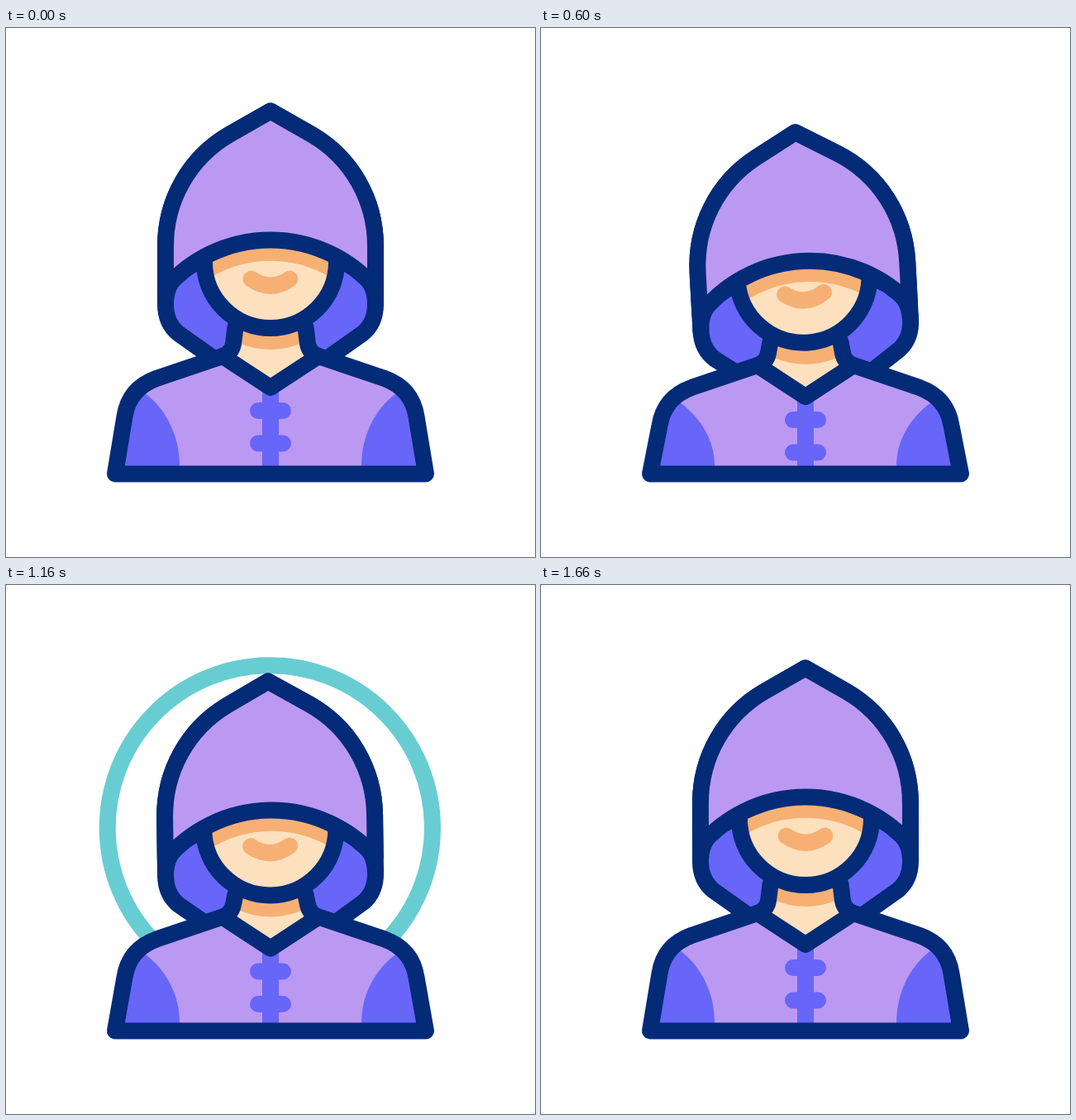
Recreate the animation shown at these times as an HTML page with a canvas. Size 640 by 640 pixels, loop 2080 ms.

```html
<!DOCTYPE html>
<html>
<head>
<meta charset="utf-8">
<title>Hooded figure</title>
<style>
html, body { margin: 0; overflow: hidden; background: #fff; }
canvas { display: block; }
</style>
</head>
<body>
<canvas width="640" height="640"></canvas>
<script>
const ctx = document.querySelector('canvas').getContext('2d');
const LOOP = 2080;
const NAVY = '#032b78', LILAC = '#bb99f2', BLUE = '#6865f9';
const SKIN = '#fde0be', ORANGE = '#f6b074', TEAL = '#68cdd2';

// Cosine easing from level to level, reached at the given times.
function ease(t, times, levels) {
  if (t <= times[0]) return levels[0];
  const i = times.findIndex(time => time > t);
  if (i < 0) return levels.at(-1);
  const u = (t - times[i - 1]) / (times[i] - times[i - 1]);
  return levels[i - 1] + (levels[i] - levels[i - 1]) * (1 - Math.cos(Math.PI * u)) / 2;
}

// Every part crouches, waits, leaps, lands and settles.
const BEATS = [220, 450, 580, 900, 1200, 1650];
const leap = (t, crouch, peak, land) => ease(t, BEATS, [0, crouch, crouch, peak, land, 0]);

// The halo hides behind the hood at its smallest and overshoots both ways.
const haloRadius = t => ease(t, [620, 1065, 1165, 1420, 1540, 1650], [120, 231, 196.5, 196.5, 231, 120]);

function shape(d, fill, stroke, width = 20) {
  const path = new Path2D(d);
  if (fill) { ctx.fillStyle = fill; ctx.fill(path); }
  if (stroke) { ctx.strokeStyle = stroke; ctx.lineWidth = width; ctx.stroke(path); }
}

function circle(y, r, fill, stroke) {
  const path = new Path2D();
  path.arc(320, y, r, 0, 2 * Math.PI);
  shape(path, fill, stroke);
}

function tilted(lift, degrees, paint) {
  ctx.save();
  ctx.translate(320, 330 + lift);
  ctx.rotate(degrees * Math.PI / 180);
  ctx.translate(-320, -330);
  paint();
  ctx.restore();
}

// Calls paint with an x mapper for the left and the right half.
function bothSides(paint) {
  for (const s of [-1, 1]) paint(d => 320 + s * d);
}

function drawNeck(body, face) {
  shape(`M277 ${355 + face}H363L378 ${397 + body}L320 ${435 + body}L262 ${397 + body}Z`, SKIN);
  shape(`M279 ${350 + face}V${380 + face}Q320 ${398 + face} 361 ${380 + face}V${350 + face}Z`, ORANGE);
  bothSides(x => shape(`M${x(42.5)} ${362 + face}L${x(45)} ${382 + body}
    Q${x(47)} ${393 + body} ${x(58)} ${397 + body}`, null, NAVY));
}

function drawBody(b) {
  const outline = `M320 ${435 + b}L262 ${397 + b}L182 ${424 + b}
    C160 ${432 + b} 147 ${448 + b} 143.5 ${470 + b}L132 539.5H508L496.5 ${470 + b}
    C493 ${448 + b} 480 ${432 + b} 458 ${424 + b}L378 ${397 + b}Z`;
  shape(outline, LILAC);
  bothSides(x => shape(`M${x(152)} ${442 + b}C${x(125)} ${462 + b} ${x(110)} ${495 + b / 2} ${x(110)} 530
    V539H${x(188)}L${x(176.5)} ${470 + b}Q${x(172)} ${455 + b} ${x(152)} ${442 + b}Z`, BLUE));
  shape(`M320 ${435 + b}V535`, null, BLUE);
  shape(`M305 ${463 + b}H335M305 ${502.5 + b}H335`, null, BLUE);
  shape(outline, null, NAVY);
}

function drawHoodBack() {
  shape(`M230 284L213 294C200 304 193 316 193 334C193 350 198 361 208.5 369.5L270 413
    H370L431.5 369.5C442 361 447 350 447 334C447 316 440 304 427 294L410 284`, BLUE, NAVY);
}

function drawHoodFront() {
  const dome = 'V264C193 208 222 157 270 129L320 100.5L370 129C418 157 447 208 447 264V';
  shape(`M193 334${dome}334`, null, NAVY);
  shape(`M193 315${dome}315A167 167 0 0 0 193 315Z`, LILAC, NAVY);
}

function draw(t) {
  const body = leap(t + 15, 12.2, -23.5, 5);
  const face = leap(t + 15, 19, -23, 13);
  const hood = leap(t, 26, -30, 18);
  const tilt = leap(t - 55, -3.1, 5.25, -2.5);
  const onFace = paint => tilted(face, tilt, paint);
  const onHood = paint => tilted(hood, tilt, paint);

  ctx.fillStyle = '#fff';
  ctx.fillRect(0, 0, 640, 640);
  ctx.lineCap = ctx.lineJoin = 'round';

  onFace(() => circle(281.5, haloRadius(t), null, TEAL));
  onHood(drawHoodBack);
  drawNeck(body, face);
  drawBody(body);
  onFace(() => circle(283, 75, SKIN));
  ctx.lineCap = 'butt';
  onHood(() => shape('M244 294A149.5 149.5 0 0 1 396 294', null, ORANGE, 17));
  ctx.lineCap = 'round';
  onFace(() => {
    circle(283, 80, null, NAVY);
    shape('M296.5 303.5Q320 320 343.5 303.5', null, ORANGE);
  });
  onHood(drawHoodFront);
}

function tick(now) {
  draw(now % LOOP);
  requestAnimationFrame(tick);
}
requestAnimationFrame(tick);
</script>
</body>
</html>
```
